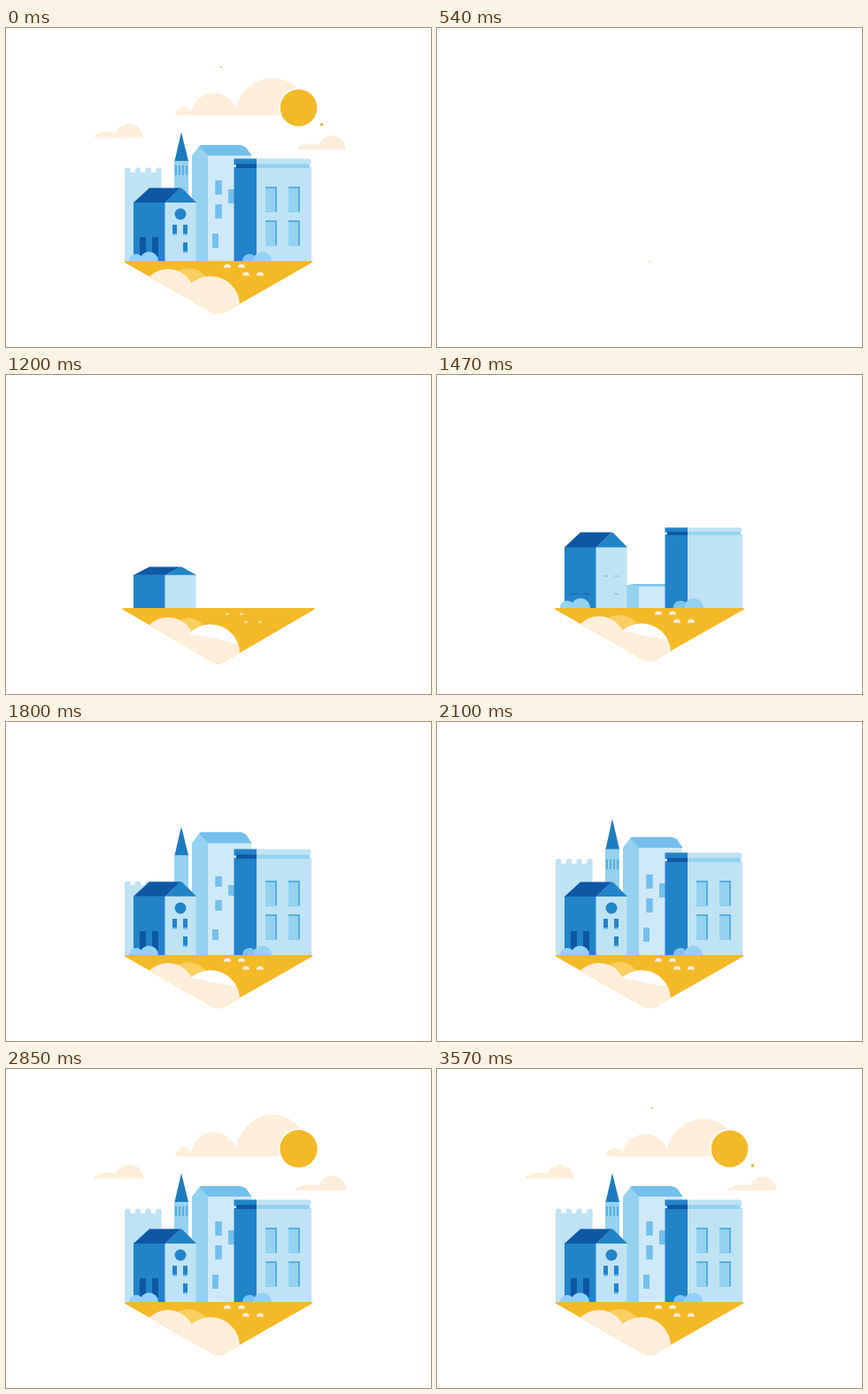
Animation of 480x360 px, one loop 3600 ms. Source, as an HTML page with a canvas:

```html
<!DOCTYPE html>
<html lang="en">
<head>
<meta charset="utf-8">
<title>City island</title>
<style>
html, body { margin: 0; width: 100%; height: 100%; overflow: hidden; background: #fff; }
canvas { display: block; }
</style>
</head>
<body>
<canvas id="stage" width="480" height="360"></canvas>
<script>
const c = document.getElementById('stage').getContext('2d');
const LOOP = 3600, GROUND = 263;
const yellow = '#f3b927', amber = '#f8cf60', cream = '#fdeedb';
const palest = '#cfe9f8', pale = '#bfe3f5', light = '#94d2f0', mid = '#74bfec';
const steel = '#58aedd', blue = '#2383c8', spireBlue = '#1c7cbd', navy = '#0e57a5';

// Smooth progress from 0 to 1.
function ease(t, start, length) {
  const p = Math.min(1, Math.max(0, (t - start) / length));
  return p * p * (3 - 2 * p);
}

// Quick rise past full size, short hold, soft settle.
function grow(t, start, over, { rise = 330, hold = 0, settle = 250 } = {}) {
  const p = Math.min(1, Math.max(0, (t - start) / rise));
  return (1 + over) * Math.sin(p * Math.PI / 2) - over * ease(t, start + rise + hold, settle);
}

function scaled(x, y, sx, sy, draw) {
  if (sx <= 0 || sy <= 0) return;
  c.save();
  c.translate(x, y);
  c.scale(sx, sy);
  c.translate(-x, -y);
  draw();
  c.restore();
}

const rising = (t, start, over, draw) =>
  scaled(240, GROUND, 1, grow(t, start, over, { hold: 180 }), draw);

function rect(color, x, y, w, h) {
  c.fillStyle = color;
  c.fillRect(x, y, w, h);
}
const wall = (color, x, y, w) => rect(color, x, y, w, GROUND - y);

function poly(color, ...points) {
  c.fillStyle = color;
  c.beginPath();
  for (const [x, y] of points) c.lineTo(x, y);
  c.fill();
}
function disc(color, x, y, r) {
  c.fillStyle = color;
  c.beginPath();
  c.arc(x, y, r, 0, 7);
  c.fill();
}
function dome(color, x, y, rx, ry = rx) {
  c.fillStyle = color;
  c.beginPath();
  c.ellipse(x, y, rx, ry, 0, Math.PI, 2 * Math.PI);
  c.fill();
}
function round(color, x, y, w, h, r) {
  c.fillStyle = color;
  c.beginPath();
  c.roundRect(x, y, w, h, r);
  c.fill();
}
// A window opening from its middle; the trim lies on its top and right edges.
function pane(s, color, x, y, w, h, trim = 0) {
  scaled(x, y + h / 2, 1, s, () => {
    rect(trim ? steel : color, x, y, w, h);
    rect(color, x, y + trim, w - trim, h - trim);
  });
}

function castle(t) {
  rising(t, 1618, .03, () => {
    wall(pale, 134, 163, 41.5);
    for (let i = 0; i < 4; i++) round(pale, 134 + 11.7 * i, 157.5, 6.5, 9, 3);
  });
}

function spire(t) {
  rising(t, 1545, .0625, () => {
    wall(light, 190, 149, 16);
    poly(spireBlue, [190.5, 150], [198, 117.5], [206, 150]);
  });
  const s = ease(t, 1790, 240);
  for (let x = 191; x < 206; x += 4) pane(s, steel, x, 155, 2, 11);
}

function tower(t) {
  rising(t, 1430, .06, () => {
    wall(palest, 228, 143, 49);
    poly(light, [210, GROUND], [210, 144], [219, 132.5], [228, 144], [228, GROUND]);
    poly(mid, [218, 133], [221, 132], [265, 132], [271, 134.5], [277.5, 144], [228, 144]);
  });
  const s = ease(t, 1650, 230);
  for (const [x, y] of [[236.5, 172], [236.5, 199], [233, 232], [251, 182]]) pane(s, mid, x, y, 7, 16);
}

function house(t) {
  rising(t, 1080, .037, () => {
    wall(blue, 144, 196.5, 36);
    wall(pale, 179.5, 196.5, 35);
    poly(blue, [180, 197], [197, 180.5], [199, 181], [215, 197]);
    poly(navy, [144, 197], [162, 180.5], [197, 180.5], [180, 197]);
  });
  const s = ease(t, 1450, 240);
  scaled(197, 210, s, s, () => disc(blue, 197, 210, 6.5));
  for (const [x, y] of [[188, 222], [200, 222], [200, 242]]) {
    pane(s, blue, x, y, 5, 10);
    pane(s, mid, x, y + 10, 5, 2);
  }
  for (const x of [151, 165]) pane(s, navy, x, 236, 7, 22);
}

function hall(t) {
  rising(t, 1290, .035, () => {
    wall(blue, 257.5, 157, 26);
    wall(pale, 283, 157, 62);
    round(pale, 257.5, 147.5, 87, 7, 3);
    rect(blue, 257.5, 147.5, 25.5, 7);
    rect(navy, 260, 153.5, 23, 4.5);
    rect(light, 283, 153.5, 60, 4.5);
  });
  const s = ease(t, 1540, 210);
  for (const x of [293, 319]) for (const y of [179, 217]) pane(s, light, x, y, 13, 28.5, 2);
}

function bushes(t) {
  const s = grow(t, 1200, .05, { rise: 200 });
  for (const [x, color] of [[147, light], [275, '#7fc5ea']]) {
    scaled(x, GROUND, s, s, () => {
      dome(color, x, GROUND, 8);
      dome(light, x + 14.5, GROUND, 10.5);
    });
  }
}

function ground(t) {
  const w = 106 * grow(t, 540, .025, { rise: 240, hold: 300, settle: 600 });
  const h = 62 * grow(t, 540, .11, { rise: 240, hold: 60, settle: 630 });
  if (w <= 0) return;
  c.save();
  c.beginPath();
  c.moveTo(240 - w, GROUND);
  c.lineTo(240 + w, GROUND);
  c.lineTo(240 + w, GROUND + 1.5);
  c.arcTo(240, GROUND + h, 240 - w, GROUND + 1.5, Math.min(14, h / 5));
  c.lineTo(240 - w, GROUND + 1.5);
  c.fillStyle = yellow;
  c.fill();
  c.clip();

  const lift = 16 * Math.exp((840 - t) / 150);
  const s = grow(t, 1050, .04, { rise: 240 });
  scaled(206, 296, s, s, () => disc(amber, 206, 296, 25));
  disc(cream, 183, 302 + lift, 30);
  const y = 313 + .85 * lift;
  disc(cream, 231, y, 33);
  if (t < 2640) shine(t, y);
  c.restore();

  const p = grow(t, 1140, .05, { rise: 200 });
  for (let i = 0; i < 4; i++) {
    const row = i >> 1, x = 250 + 21 * row + 16 * (i % 2), base = 270.5 + 9 * row;
    scaled(x, base, p, p, () => dome(cream, x, base, 4));
  }
}

// White crown of the front cloud above its cream swell.
function shine(t, y) {
  const swell = 1 - ease(t, 840, 630);
  c.save();
  c.beginPath();
  c.arc(231, y, 32.5, 0, 7);
  c.clip();
  c.beginPath();
  c.moveTo(207, 250);
  c.lineTo(207, 288 + 12 * swell);
  c.quadraticCurveTo(237, 295, 265, 299 + 17 * swell);
  c.lineTo(265, 250);
  c.fillStyle = '#fff';
  c.fill();
  c.restore();
}

function cloudlet(t, start, x, y) {
  const s = grow(t, start, .06);
  scaled(x, y, s, s, () => {
    dome(cream, x - 12, y, 15.5, 6.5);
    dome(cream, x + 12, y, 15.5);
  });
}

function sky(t) {
  cloudlet(t, 2370, 127, 123.5);
  cloudlet(t, 2450, 356, 137);

  const pop = { rise: 240, hold: 60 };
  const small = grow(t, 2560, .09, pop), big = grow(t, 2580, .12, pop);
  scaled(262, 98.5, Math.min(small, 1), small, () => {
    dome(cream, 201, 98.5, 10, 9.5);
    dome(cream, 235, 98.5, 26, 25);
    rect(cream, 201, 95, 100, 3.5);
  });
  scaled(301, 98.5, Math.min(big, 1), big, () => dome(cream, 301, 98.5, 42));

  const sun = grow(t, 2560, .02, { rise: 240 });
  scaled(330.5, 90, sun, sun, () => {
    disc('#fff', 330.5, 90, 22.5);
    disc(yellow, 330.5, 90, 20.8);
  });

  const dots = grow(t, 2940, .3, { rise: 180 });
  disc('#cfc565', 242.5, 44, 1.1 * dots);
  disc('#d0b83c', 356.5, 109, 1.7 * dots);
}

function frame() {
  let t = performance.now() % LOOP;
  rect('#fff', 0, 0, 480, 360);
  if (t < 270) t += LOOP;
  if (t >= 540) {
    for (const draw of [castle, spire, tower, house, hall, bushes, ground, sky]) draw(t);
  }
  requestAnimationFrame(frame);
}
frame();
</script>
</body>
</html>
```
